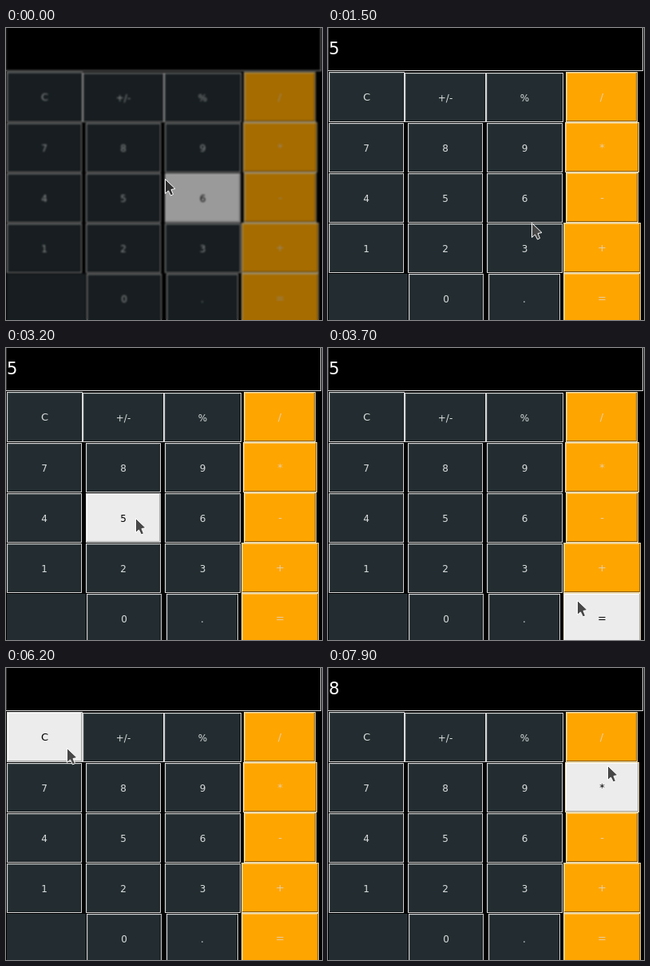
These frames come from a looping animation (396 px wide and 366 px high, 8000 ms). An HTML page with a canvas:

```html
<!DOCTYPE html>
<html lang="en">
<head>
<meta charset="utf-8">
<title>Calculator</title>
<style>
html, body { margin: 0; width: 100%; height: 100%; overflow: hidden; background: #000; }
canvas { display: block; }
</style>
</head>
<body>
<canvas id="stage" width="396" height="366"></canvas>
<script>
const W = 396, H = 366, LOOP = 8000;
const ctx = document.getElementById('stage').getContext('2d');
const layer = document.createElement('canvas');
layer.width = W;
layer.height = H;
const ui = layer.getContext('2d');

const themes = {
  dark: { fill: '#232d31', rim: '#d9d9d9', light: '#465053', shade: '#14191b', text: '#d9dcdc' },
  orange: { fill: '#ffa500', rim: '#ead9ae', light: '#ffcb69', shade: '#8f5d00', text: '#e6d0a4' },
  hover: { fill: '#ececec', rim: '#d9d9d9', light: '#ffffff', shade: '#a8a8a8', text: '#000000' }
};

// label, left, top, right, bottom
const buttons = [
  ['C', 1, 55, 96, 118], ['+/-', 96, 56, 198, 118], ['%', 198, 56, 295, 118], ['/', 298, 55, 388, 118],
  ['7', 1, 119, 95, 181], ['8', 100, 119, 194, 181], ['9', 199, 119, 294, 181], ['*', 297, 118, 390, 181],
  ['4', 1, 182, 95, 244], ['5', 100, 182, 194, 244], ['6', 199, 182, 294, 244], ['-', 298, 181, 389, 244],
  ['1', 1, 245, 95, 307], ['2', 100, 245, 194, 307], ['3', 199, 245, 294, 307], ['+', 295, 244, 392, 307],
  ['0', 101, 308, 195, 370], ['.', 201, 308, 291, 370], ['=', 295, 307, 392, 370]
].map(([label, x, y, x2, y2]) => ({
  label, x, y, x2, y2, theme: '/*-+='.includes(label) ? themes.orange : themes.dark
}));

// time, pointer x, pointer y
const path = [
  [0, 199, 189], [200, 161, 207], [1200, 161, 207], [1700, 318, 268], [2100, 318, 268],
  [2300, 250, 246], [2600, 206, 227], [2700, 206, 227], [2800, 162, 213], [3200, 162, 213],
  [3700, 312, 316], [4000, 318, 325], [4400, 318, 325], [4900, 309, 310], [5300, 79, 105],
  [5700, 79, 105], [5900, 77, 102], [6100, 77, 102], [6200, 76, 100], [6500, 125, 150],
  [7400, 125, 150], [7900, 350, 122], [LOOP, 350, 122]
];

const presses = [[1900, 2000], [3000, 3200], [3900, 4000], [5400, 5500], [7300, 7400]];
const readouts = [[0, ''], [700, '5'], [2000, ''], [3000, '5'], [4000, '10'], [5500, ''], [7400, '8']];

function pointerAt(t) {
  const i = path.findIndex(p => p[0] > t);
  const [t0, x0, y0] = path[i - 1], [t1, x1, y1] = path[i];
  const k = (t - t0) / (t1 - t0);
  return { x: Math.round(x0 + (x1 - x0) * k), y: Math.round(y0 + (y1 - y0) * k) };
}

function rect(color, x, y, w, h) {
  ui.fillStyle = color;
  ui.fillRect(x, y, w, h);
}

function drawButton(b, hovered, pressed) {
  const s = hovered ? themes.hover : b.theme;
  const w = b.x2 - b.x, h = b.y2 - b.y;
  const [near, far] = pressed ? [s.shade, s.light] : [s.light, s.shade];
  rect(s === themes.hover ? b.theme.rim : s.rim, b.x, b.y, w, h);
  rect(far, b.x + 1, b.y + 1, w - 2, h - 2);
  rect(near, b.x + 1, b.y + 1, w - 3, h - 3);
  rect(s.fill, b.x + 2, b.y + 2, w - 4, h - 4);
  const size = b.label === 'C' || b.theme === themes.orange ? 13 : 12;
  ui.font = size + 'px "DejaVu Sans", sans-serif';
  ui.textAlign = 'center';
  ui.fillStyle = s.text;
  ui.fillText(b.label, (b.x + b.x2) / 2, (b.y + Math.min(b.y2, b.y + 62)) / 2 + 5);
}

function drawCalculator(t, pointer) {
  rect('#000', 0, 0, W, H);
  rect('#3a3a3a', 0, 0, 1, 54);
  rect('#d9d9d9', 0, 53, 395, 1);
  rect('#d9d9d9', 394, 0, 1, 54);
  rect(themes.dark.fill, 1, 308, 99, 58);
  const readout = readouts.filter(r => r[0] <= t).pop()[1];
  ui.font = '21px "DejaVu Sans", sans-serif';
  ui.textAlign = 'left';
  ui.fillStyle = '#fff';
  ui.fillText(readout, 1, 33);
  const down = presses.some(([from, to]) => t >= from && t < to);
  for (const b of buttons) {
    const over = pointer.x >= b.x && pointer.x < b.x2 && pointer.y >= b.y && pointer.y < b.y2;
    drawButton(b, over, over && down);
  }
}

function drawPointer({ x, y }, dimmed) {
  const arrow = [[0, 0], [0, 18], [4, 14.5], [7, 20.5], [10, 19], [7.5, 13], [12.5, 12]];
  ctx.beginPath();
  for (const [dx, dy] of arrow) ctx.lineTo(x + 0.5 + dx, y + 0.5 + dy);
  ctx.closePath();
  ctx.fillStyle = dimmed ? '#303030' : '#484848';
  ctx.strokeStyle = '#fff';
  ctx.lineWidth = 1;
  ctx.fill();
  ctx.stroke();
}

function frame(now) {
  const t = Math.floor(now % LOOP / 100) * 100;
  const pointer = pointerAt(t);
  const dimmed = t < 700;
  drawCalculator(t, pointer);
  ctx.drawImage(layer, 0, 0);
  if (dimmed) {
    ctx.filter = 'blur(0.8px)';
    ctx.drawImage(layer, 0, 0);
    ctx.filter = 'none';
    ctx.fillStyle = 'rgba(0, 0, 0, 0.35)';
    ctx.fillRect(0, 0, W, H);
  }
  drawPointer(pointer, dimmed);
}

const start = performance.now();
function tick() {
  frame(performance.now() - start);
  requestAnimationFrame(tick);
}
tick();
</script>
</body>
</html>
```
